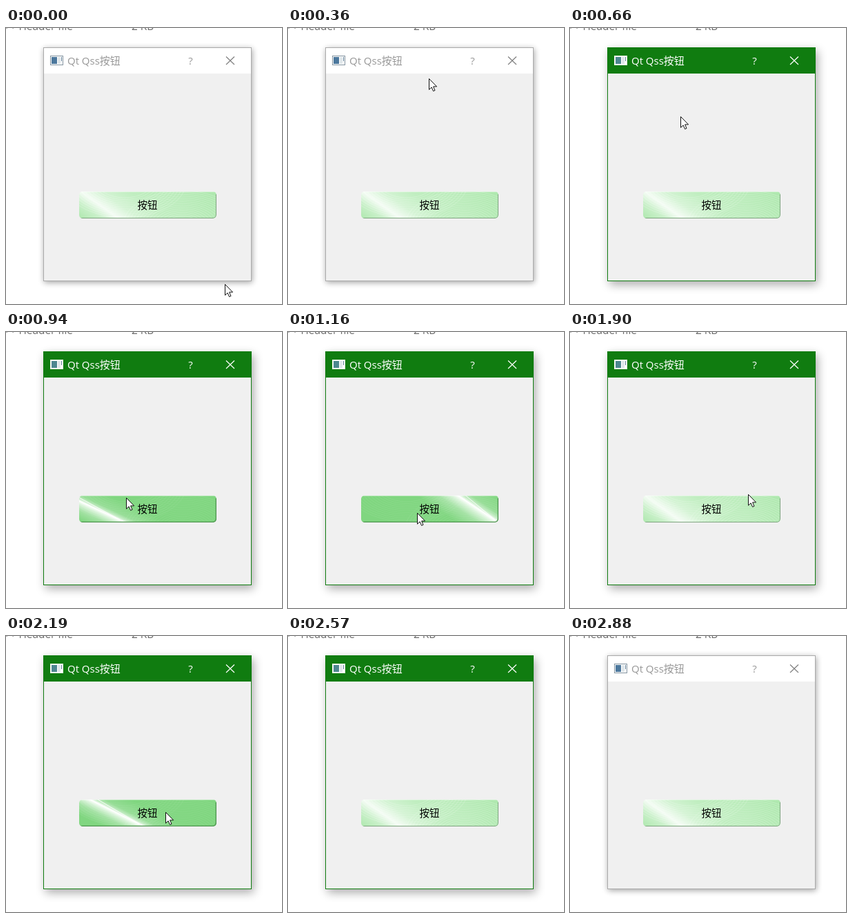
An HTML page for the animation above (2.94 s loop, 400 px wide and 400 px high).

```html
<!DOCTYPE html>
<html lang="zh-CN">
<head>
<meta charset="utf-8">
<title>Button hover</title>
<style>
html, body { margin: 0; width: 100%; height: 100%; overflow: hidden; background: #fff; }
svg { display: block; width: 100vw; height: 100vh; }
text { font-family: "Open Sans", "Noto Sans CJK SC", "Noto Sans CJK", sans-serif; font-size: 15px; }
.list { fill: #6d6d6d; font-size: 15.4px; }
.label { font: 14.5px "Noto Sans CJK SC", "Noto Sans CJK", sans-serif; }
</style>
</head>
<body>
<svg viewBox="0 0 400 400">
  <defs>
    <filter id="soft" x="-20%" y="-20%" width="140%" height="140%">
      <feGaussianBlur id="blur" stdDeviation="4"/>
    </filter>
    <linearGradient id="rest" gradientUnits="userSpaceOnUse" x1="80" y1="0" x2="330" y2="0"
      gradientTransform="matrix(1 0 1.4 1 -358.4 0)">
      <stop offset="0" stop-color="#b0e8b0"/>
      <stop offset=".12" stop-color="#c9f0c9"/>
      <stop offset=".22" stop-color="#f4fcf4"/>
      <stop offset=".34" stop-color="#d3f3d3"/>
      <stop offset=".5" stop-color="#c1eec1"/>
      <stop offset="1" stop-color="#aee8ae"/>
    </linearGradient>
    <linearGradient id="shine" gradientUnits="userSpaceOnUse" x1="-60" y1="0" x2="60" y2="0">
      <stop offset="0" stop-color="#80d680"/>
      <stop offset=".26" stop-color="#a4e2a4"/>
      <stop offset=".42" stop-color="#daf4da"/>
      <stop offset=".5" stop-color="#fff"/>
      <stop offset=".56" stop-color="#c4ecc4"/>
      <stop offset=".66" stop-color="#96dd96"/>
      <stop offset="1" stop-color="#80d680"/>
    </linearGradient>
    <clipPath id="face"><rect x="106" y="237" width="199" height="39" rx="5"/></clipPath>
  </defs>

  <rect width="400" height="400" fill="#fff"/>
  <text class="list" x="97" y="3" text-anchor="end">C++ Header file</text>
  <text class="list" x="182" y="3">2 KB</text>

  <rect id="shadow" width="302" height="339" filter="url(#soft)"/>
  <rect x="54" y="28" width="302" height="339" fill="#f0f0f0"/>
  <rect id="bar" x="55" y="29" width="300" height="37"/>
  <rect id="frame" x="54.5" y="28.5" width="301" height="338" fill="none"/>

  <rect id="iconEdge" x="64.5" y="40.5" width="18" height="13" fill="#fff"/>
  <rect id="iconPane" x="66" y="42" width="8" height="10"/>
  <rect x="75" y="42" width="4" height="10" fill="#dfe6ea"/>
  <rect x="80" y="42" width="1" height="6" fill="#5f7f99"/>

  <g id="caption">
    <text x="89" y="53">Qt Qss按钮</text>
    <text x="267.5" y="53" text-anchor="middle" font-size="16">?</text>
  </g>
  <path id="close" d="M319 41.5l12 11.5M331 41.5l-12 11.5" fill="none" stroke-width="1.2"/>

  <g clip-path="url(#face)">
    <rect id="fill" x="106" y="237" width="199" height="39"/>
    <g id="rings" fill="none" stroke="#fff" stroke-width=".7"></g>
    <path id="streak" fill="none" stroke="#fff"/>
    <path d="M106 237.5H305" stroke="#fff" stroke-opacity=".45"/>
    <path id="edge" d="M108 275.5H300Q304.5 275 304.5 270V241" fill="none"/>
  </g>
  <text class="label" x="205" y="262" text-anchor="middle">按钮</text>

  <path id="cursor" d="M.5 .5V16.3L4.1 12.9L6.6 18.5L9 17.4L6.6 11.9H11.6Z" fill="#fff" stroke="#111"/>
</svg>
<script>
const LOOP = 2940;
const WAKE = 420, SLEEP = 2880;

// time, pointer x, pointer y, centre of the shine while hovered
const poses = [
  [0, 317, 371], [60, 304, 334], [130, 282, 272], [200, 254, 197],
  [280, 226, 126], [350, 204, 73], [420, 190, 43],
  [580, 176, 84], [660, 160, 128], [720, 158, 160], [780, 160, 190], [860, 166, 217],
  [940, 174, 240, 130], [1020, 181, 253, 185], [1100, 185, 260, 235],
  [1160, 187, 262, 275], [1320, 187, 262, 335],
  [1460, 210, 209], [1540, 222, 190], [1600, 236, 211],
  [1680, 248, 246, 110], [1750, 256, 270, 175], [1820, 259, 256, 230], [1900, 258, 235],
  [2030, 252, 252, 85], [2080, 245, 266, 110], [2130, 237, 263, 135], [2190, 231, 255, 160],
  [2350, 262, 300], [2420, 296, 346], [2500, 329, 385], [2570, 329, 420]
];

const $ = id => document.getElementById(id);
const set = (id, attrs) => {
  for (const key in attrs) $(id).setAttribute(key, attrs[key]);
};

function addRings(cx, cy, first, step, count) {
  for (let i = 0; i < count; i++) {
    const ring = document.createElementNS($("rings").namespaceURI, "ellipse");
    const r = first + i * step;
    const attrs = { cx, cy, rx: r * 1.7, ry: r };
    for (const key in attrs) ring.setAttribute(key, attrs[key]);
    $("rings").append(ring);
  }
}
addRings(256, 287, 12, 2.6, 16);
addRings(172, 222, 24, 2.6, 12);

function drawWindow(active) {
  const ink = active ? "#fff" : "#999";
  set("bar", { fill: active ? "#107c10" : "#fff" });
  set("frame", { stroke: active ? "#107c10" : "#aaa" });
  set("caption", { fill: ink });
  set("close", { stroke: active ? "#fff" : "#808080" });
  set("iconEdge", { stroke: active ? "#e9f2e9" : "#8494a0" });
  set("iconPane", { fill: active ? "#4d8790" : "#4c789d" });
  set("blur", { stdDeviation: active ? 7 : 4 });
  set("shadow", {
    x: active ? 57 : 55,
    y: active ? 33 : 30,
    opacity: active ? 0.33 : 0.36
  });
}

function drawButton(shine) {
  const hover = shine !== undefined;
  set("fill", { fill: hover ? "url(#shine)" : "url(#rest)" });
  set("edge", {
    stroke: hover ? "#4f9650" : "#7fa580",
    "stroke-width": hover ? 1.6 : 1
  });
  set("rings", { "stroke-opacity": hover ? 0.1 : 0.3 });
  set("streak", { opacity: hover ? 0.9 : 0 });
  if (!hover) return;
  const slant = 2.7 - shine / 230;
  const top = shine - 19 * slant, foot = shine + 19 * slant;
  set("shine", { gradientTransform: `matrix(1 0 ${slant} 1 ${shine - 256 * slant} 0)` });
  set("streak", { d: `M${top} 237L${foot} 275M${top + 11} 237L${foot} 275` });
}

function draw(time) {
  const pose = poses.findLast(p => p[0] <= time);
  drawWindow(time >= WAKE && time < SLEEP);
  drawButton(pose[3]);
  set("cursor", { transform: `translate(${pose[1]} ${pose[2]})` });
}

const start = performance.now();
function tick() {
  draw((performance.now() - start) % LOOP);
  requestAnimationFrame(tick);
}
tick();
</script>
</body>
</html>
```
